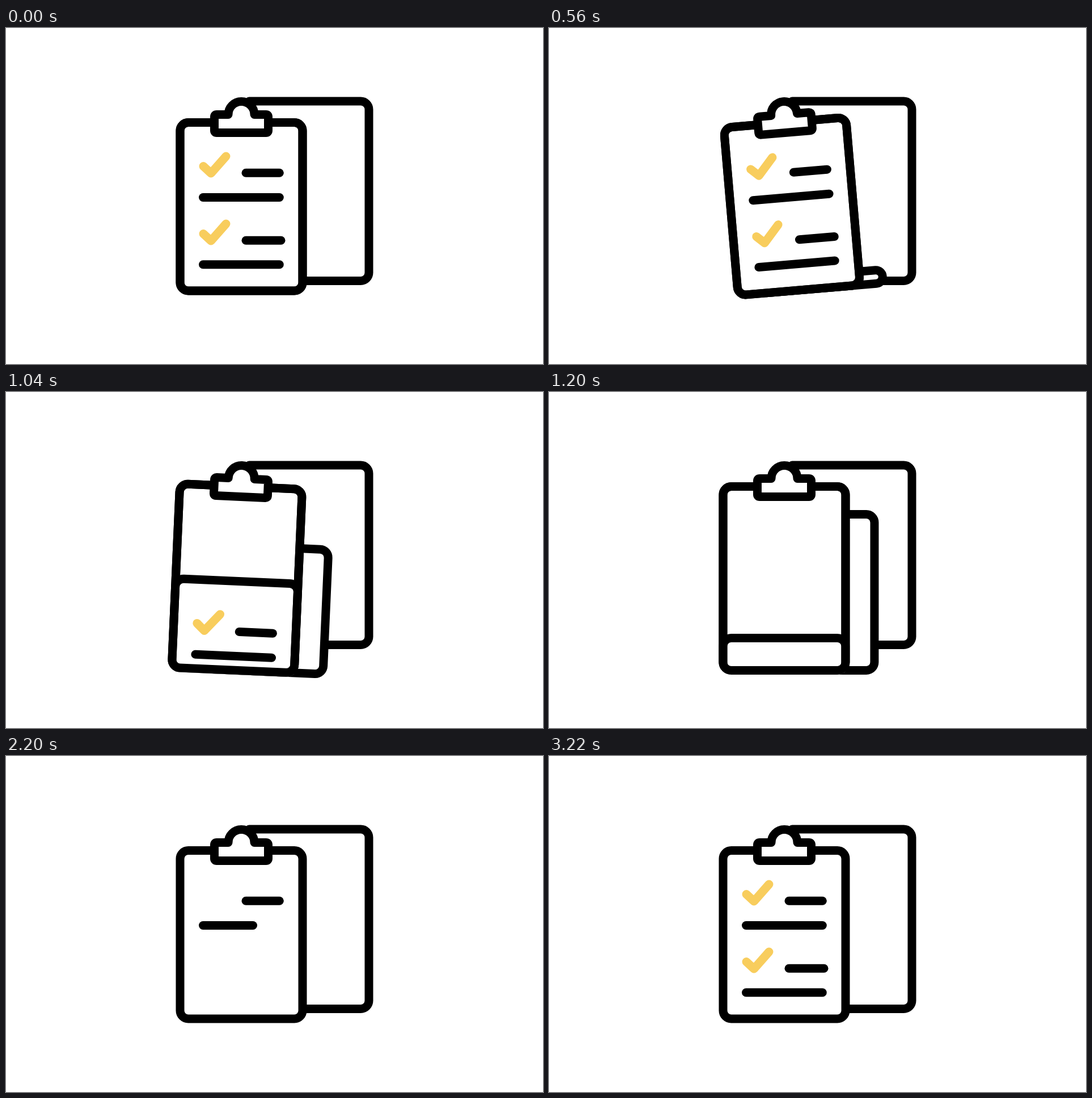
An HTML page with a canvas for the animation above (3.6 s loop, 947 px wide and 592 px high).

```html
<!DOCTYPE html>
<html lang="en">
<head>
<meta charset="utf-8">
<title>Checklist clipboard</title>
<style>
  html, body { margin: 0; height: 100%; overflow: hidden; background: #fff; }
  canvas { display: block; }
</style>
</head>
<body>
<canvas id="stage" width="947" height="592"></canvas>
<script>
const ctx = document.getElementById('stage').getContext('2d');
const LOOP = 3600, INK = '#000', GOLD = '#f8cd5d';
const PIVOT = { x: 415, y: 157 };
const LEFT = 307, RIGHT = 523, TOP = 166.5, BOTTOM = 463, RADIUS = 14.5;

// Eased keyframes, each [time, value]
const SWING = [[0, 0], [190, 4.5], [570, -4.9], [1010, 2.7], [1210, 0]];
const FLOOR = [[580, BOTTOM], [800, 490.5], [1340, 490.5], [1520, BOTTOM]];
const DROP = [[660, 0], [1407, 324]];
const SHEET_TOP = [[350, BOTTOM], [1510, TOP]];
const SHEET_RIGHT = [[350, RIGHT], [650, 574], [1620, 574], [1720, 580.5], [1920, RIGHT]];

// Strokes in drawing order: colour, start, end, points
const tick = y => [348, y, 361.5, y + 12.5, 388, y - 17.5];
const MARKS = [
  [INK, 1920, 2090, [423, 255.3, 482.3, 255.3]],
  [INK, 2090, 2260, [347.5, 298.5, 482.3, 298.5]],
  [INK, 2260, 2430, [423, 374.3, 485, 374.3]],
  [INK, 2430, 2600, [347.5, 416.7, 482.3, 416.7]],
  [GOLD, 2600, 2910, tick(243.5)],
  [GOLD, 2910, 3220, tick(362.5)]
];

const clamp = v => Math.min(1, Math.max(0, v));

function track(keys, t) {
  let [time, value] = keys[0];
  for (const [nextTime, nextValue] of keys.slice(1)) {
    if (t < nextTime) {
      const p = clamp((t - time) / (nextTime - time));
      return value + (nextValue - value) * (1 - Math.cos(Math.PI * p)) / 2;
    }
    [time, value] = [nextTime, nextValue];
  }
  return value;
}

function outline(path) {
  ctx.strokeStyle = INK;
  ctx.fill(path);
  ctx.stroke(path);
}

function sheet(x, top, bottom, grow = 0) {
  const path = new Path2D();
  path.roundRect(x - grow, top - grow, RIGHT - LEFT + 2 * grow,
    Math.max(0, bottom - top) + 2 * grow, RADIUS + grow);
  return path;
}

// Draws the first part (0 to 1) of a polyline
function trace(color, pts, part) {
  if (part <= 0) return;
  let length = 0;
  ctx.beginPath();
  ctx.moveTo(pts[0], pts[1]);
  for (let i = 2; i < pts.length; i += 2) {
    ctx.lineTo(pts[i], pts[i + 1]);
    length += Math.hypot(pts[i] - pts[i - 2], pts[i + 1] - pts[i - 1]);
  }
  ctx.strokeStyle = color;
  ctx.setLineDash(part < 1 ? [length * part, 999] : []);
  ctx.stroke();
  ctx.setLineDash([]);
}

const backPage = new Path2D(
  'M429 129H625.5A14.5 14.5 0 0 1 640 143.5V431A14.5 14.5 0 0 1 625.5 445.5H429');
const clasp = new Path2D(
  'M371.5 152.5H392A22.7 22.7 0 0 1 438 152.5H458.5Q462.5 152.5 462.5 156.5' +
  'V180.5Q462.5 184.5 458.5 184.5H371.5Q367.5 184.5 367.5 180.5V156.5Q367.5 152.5 371.5 152.5Z');

function draw(t) {
  const floor = track(FLOOR, t);
  ctx.clearRect(0, 0, 947, 592);
  ctx.fillStyle = '#fff';
  ctx.lineWidth = 15;
  ctx.lineCap = ctx.lineJoin = 'round';
  outline(backPage);

  ctx.save();
  ctx.translate(PIVOT.x, PIVOT.y);
  ctx.rotate(track(SWING, t) * Math.PI / 180);
  ctx.translate(-PIVOT.x, -PIVOT.y);

  if (t > 350 && t < 1920) {
    const x = track(SHEET_RIGHT, t) - RIGHT + LEFT;
    outline(sheet(x, track(SHEET_TOP, t), floor));
  }

  const board = sheet(LEFT, TOP, floor);
  outline(board);

  if (t < 1520) {
    // The finished page slides down and out through the board's lower edge
    const drop = track(DROP, t);
    ctx.save();
    ctx.clip(sheet(LEFT, TOP, floor, 7.5));
    ctx.translate(0, drop);
    if (drop > 0) outline(sheet(LEFT, TOP, BOTTOM));
    for (const [color, , , pts] of MARKS) trace(color, pts, 1);
    ctx.restore();
    ctx.strokeStyle = INK;
    ctx.stroke(board);
  } else {
    for (const [color, start, end, pts] of MARKS)
      trace(color, pts, clamp((t - start) / (end - start)));
  }

  outline(clasp);
  ctx.restore();
}

const begin = performance.now();
function frame() {
  draw((performance.now() - begin) % LOOP);
  requestAnimationFrame(frame);
}
frame();
</script>
</body>
</html>
```
